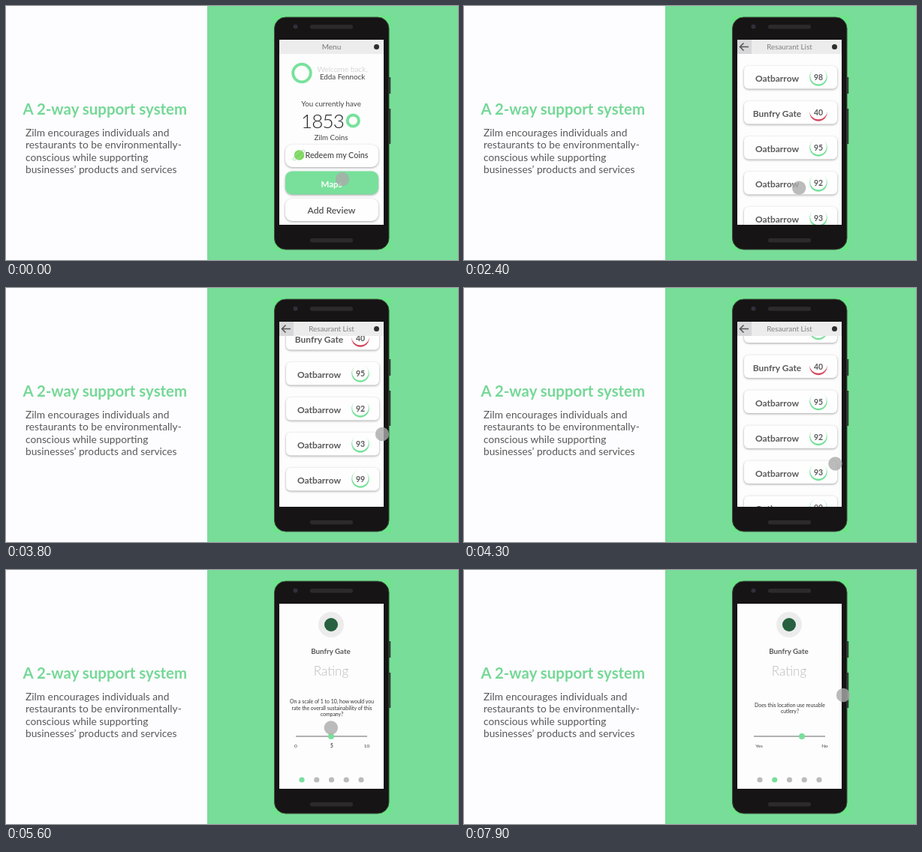
Animation of 602x339 px, one loop 8000 ms. Source, as an HTML page:

```html
<!DOCTYPE html>
<html lang="en">
<head>
<meta charset="utf-8">
<title>A 2-way support system</title>
<style>
  html, body { margin: 0; width: 100%; height: 100%; overflow: hidden; background: #fdfcfe; }
  svg { display: block; width: 602px; height: 339px; font-family: Lato, "Open Sans", sans-serif; }
  .mid { text-anchor: middle; }
  .card { fill: #fefefe; filter: drop-shadow(0 1px 1.5px rgba(0, 0, 0, .35)); }
  .small { font-size: 9.8px; fill: #444; }
  .bold { font-weight: 700; fill: #5a5a5c; }
  .ask { font-size: 6.9px; fill: #333; }
  .mark { font-size: 6.5px; fill: #444; }
  .ring { fill: none; stroke: #78e29c; }
  .soft { filter: blur(.35px); }
</style>
</head>
<body>
<svg viewBox="0 0 602 339">
  <defs><clipPath id="screen"><rect x="364" y="45" width="139" height="247"/></clipPath></defs>
  <rect width="268" height="339" fill="#fdfcfe"/>
  <rect x="268" width="334" height="339" fill="#78dd99"/>
  <text x="22.5" y="144.500" font-size="20.4" font-weight="700" fill="#75d897">A 2-way support system</text>
  <g font-size="13.75" fill="#595959">
    <text x="26" y="174">Zilm encourages individuals and</text>
    <text x="26" y="190.3">restaurants to be environmentally-</text>
    <text x="26" y="206.6">conscious while supporting</text>
    <text x="26" y="223">businesses’ products and services</text>
  </g>

  <g class="soft">
    <!-- phone -->
    <rect x="356" y="13" width="157" height="313" fill="#6ee48b"/>
    <path d="M511 95v22M511 137v47" stroke="#2c3a30" stroke-width="2.5"/>
    <rect x="357.5" y="15" width="152.5" height="310" rx="15" fill="#161415" stroke="#3c4a40" stroke-width="1"/>
    <circle cx="385.500" cy="27.500" r="3" fill="#30303a"/>
    <rect x="405" y="25" width="57" height="5.500" rx="2.500" fill="#2c2a2b"/>
    <rect x="405" y="310" width="57" height="5.500" rx="2.500" fill="#2c2a2b"/>
    <rect x="364" y="45" width="139" height="247" fill="#fdfdfe"/>

    <g clip-path="url(#screen)">
      <g id="home">
        <rect x="364" y="45" width="139" height="19" fill="#ececed"/>
        <text class="mid" x="433.5" y="58" font-size="10" fill="#777">Menu</text>
        <circle cx="493.500" cy="54.500" r="3.500" fill="#2b2f2d"/>
        <circle class="ring" cx="394" cy="89.500" r="11.800" stroke-width="3.800"/>
        <text class="mid" x="448" y="88" font-size="10.3" font-weight="300" fill="#bbb">Welcome back,</text>
        <text class="mid small" x="448" y="97.500">Edda Fennock</text>
        <text class="mid small" x="433" y="133.500">You currently have</text>
        <text class="mid" x="421.500" y="163" font-size="26" font-weight="300" letter-spacing="-.8" fill="#222">1853</text>
        <circle class="ring" cx="462.300" cy="153" r="7.600" stroke-width="4"/>
        <text class="mid small" x="433" y="179">Zilm Coins</text>
        <rect class="card" x="372" y="185" width="124" height="30" rx="9"/>
        <circle cx="390.500" cy="199" r="6.800" fill="#7ed860"/>
        <ellipse cx="390" cy="199" rx="10" ry="3" fill="none" stroke="#a9dfae" stroke-width=".8" transform="rotate(-40 390 199)"/>
        <text class="mid" x="440.500" y="202.500" font-size="10.7" font-weight="500" fill="#444">Redeem my Coins</text>
        <rect class="card" x="372" y="220.500" width="124" height="31" rx="9" style="fill:#78e09b"/>
        <text class="mid" x="433.500" y="241.500" font-size="11.500" font-weight="700" fill="#fff">Maps</text>
        <rect class="card" x="372" y="257" width="124" height="30" rx="9"/>
        <text class="mid" x="433.500" y="277" font-size="12.2" font-weight="500" fill="#444">Add Review</text>
      </g>

      <g id="list">
        <g id="rows"></g>
        <rect x="364" y="45" width="139" height="19" fill="#ececed"/>
        <rect x="364" y="45" width="19" height="19" fill="#d8d8da"/>
        <path d="M379 54.500H367.500m5-5-5 5 5 5" fill="none" stroke="#555" stroke-width="1.500"/>
        <text class="mid" x="433.500" y="58" font-size="9.8" fill="#808080">Resaurant List</text>
        <circle cx="493.500" cy="54.500" r="3.500" fill="#2b2f2d"/>
      </g>

      <g id="rating">
        <circle cx="433" cy="73" r="17" fill="#ebeceb"/>
        <circle cx="433" cy="73" r="9" fill="#27613f"/>
        <text class="mid bold" x="432.500" y="111.500" font-size="9.8">Bunfry Gate</text>
        <text class="mid" x="433" y="140.500" font-size="17" font-weight="300" fill="#bbb">Rating</text>
        <g id="first">
          <text class="mid ask" x="434" y="178">On a scale of 1 to 10, how would you</text>
          <text class="mid ask" x="434" y="186.500">rate the overall sustainability of this</text>
          <text class="mid ask" x="434" y="195">company?</text>
          <text class="mid mark" x="386" y="237">0</text>
          <text class="mid mark" id="value" y="237" font-weight="700"></text>
          <text class="mid mark" x="480.500" y="237">10</text>
        </g>
        <g id="second">
          <text class="mid ask" x="434" y="182.500">Does this location use reusable</text>
          <text class="mid ask" x="434" y="190.500">cutlery?</text>
          <text class="mid mark" x="393" y="237">Yes</text>
          <text class="mid mark" x="480.500" y="237">No</text>
        </g>
        <path d="M386 222h95" stroke="#999" stroke-width="1.500"/>
        <circle id="knob" cy="222" r="4" fill="#78df9b"/>
        <g id="dots"></g>
      </g>
    </g>
    <circle id="touch" r="9.200" fill="#aaa" opacity=".8"/>
  </g>
</svg>
<script>
const $ = id => document.getElementById(id);
const LOOP = 8000, STEP = 100;
const LIST_AT = 2100, RATING_AT = 5300, SECOND_AT = 6900;

// Each key is [time, value, ...]; values ease between keys.
const touchKeys = [
  [0, 448, 231], [1400, 443, 248], [1900, 436, 239], [2200, 438, 239], [3100, 503, 268],
  [3300, 503, 266], [3800, 501, 195], [4000, 500, 194], [4600, 489, 275], [4700, 488, 276],
  [5100, 432, 148], [5300, 432, 148], [5700, 433, 222], [6000, 455, 222], [6300, 474, 158],
  [6600, 482, 166], [6900, 398, 168], [7200, 433, 222], [7500, 450, 222], [7900, 505, 167]
];
const scrollKeys = [[3200, 0], [3300, -2], [3800, -75], [4000, -75], [4600, 0]];
const firstKnob = [[5700, 433], [6000, 455]];
const secondKnob = [[7200, 433], [7500, 450]];

function track(keys, t) {
  const next = keys.findIndex(k => k[0] > t);
  if (next < 0) return keys[keys.length - 1].slice(1);
  if (next === 0) return keys[0].slice(1);
  const a = keys[next - 1], b = keys[next];
  const p = (t - a[0]) / (b[0] - a[0]), e = p * p * (3 - 2 * p);
  return a.slice(1).map((v, i) => v + (b[i + 1] - v) * e);
}

// A white disc shifted upwards leaves a crescent; lower scores leave less of it.
function scoreRing(score, y) {
  const hole = 12.9 - score * .022;
  return `<circle cx="472" cy="${y}" r="11.7" fill="${score < 50 ? '#d4495c' : '#78e09b'}"/>
    <circle cx="472" cy="${y + 9.3 - hole}" r="${hole}" fill="#fefefe"/>`;
}

$('rows').innerHTML = [98, 40, 95, 92, 93, 99].map((score, i) => {
  const y = 96 + 47 * i;
  return `<rect class="card" x="373" y="${y - 16}" width="124" height="30.500" rx="6"/>
    <text class="mid bold" x="417" y="${y + 5}" font-size="12">${score < 50 ? 'Bunfry Gate' : 'Oatbarrow'}</text>
    ${scoreRing(score, y - 1)}
    <text class="mid bold" x="472" y="${y + 3}" font-size="10.5">${score}</text>`;
}).join('');

$('dots').innerHTML = [0, 1, 2, 3, 4].map(i =>
  `<circle cx="${394 + 19.75 * i}" cy="280" r="3.600"/>`).join('');

const show = (id, on) => $(id).setAttribute('display', on ? 'inline' : 'none');

function draw(t) {
  const second = t >= SECOND_AT;
  show('home', t < LIST_AT);
  show('list', t >= LIST_AT && t < RATING_AT);
  show('rating', t >= RATING_AT);
  show('first', !second);
  show('second', second);

  $('rows').setAttribute('transform', `translate(0 ${track(scrollKeys, t)[0]})`);
  const [knob] = track(second ? secondKnob : firstKnob, t);
  $('knob').setAttribute('cx', knob);
  $('value').setAttribute('x', knob + 1);
  $('value').textContent = Math.round(5 + (knob - 433) / 22 * 3);
  [...$('dots').children].forEach((dot, i) =>
    dot.setAttribute('fill', i === +second ? '#78df9b' : '#bbb'));

  const [x, y] = track(touchKeys, t);
  $('touch').setAttribute('cx', x);
  $('touch').setAttribute('cy', y);
}

const start = performance.now();
function tick() {
  const t = (performance.now() - start) % LOOP;
  draw(Math.floor(t / STEP) * STEP);
  requestAnimationFrame(tick);
}
tick();
</script>
</body>
</html>
```
